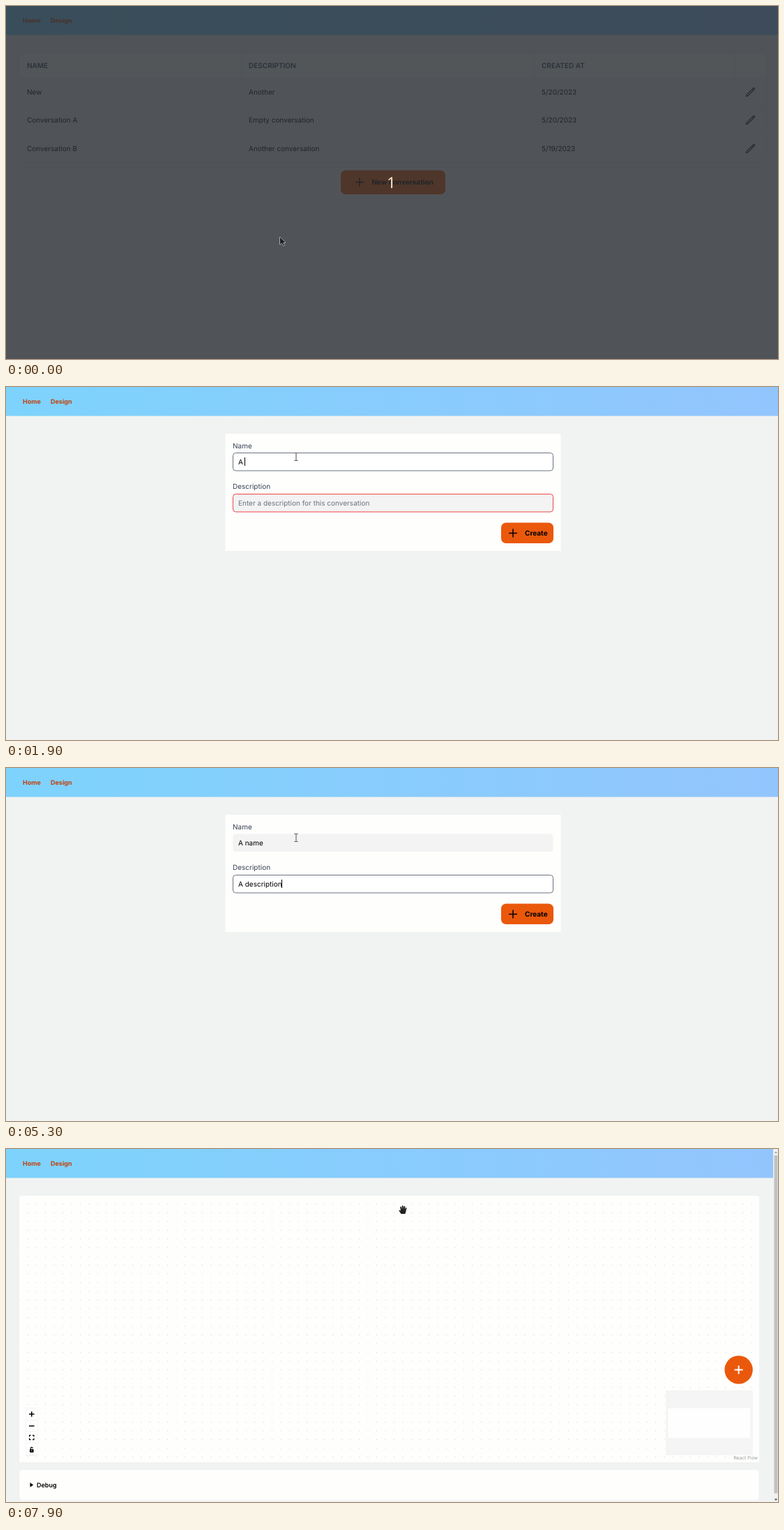
An HTML page for the animation above (8000 ms loop, 1107x506 px).

```html
<!DOCTYPE html>
<html lang="en">
<head>
<meta charset="utf-8">
<title>Conversation designer</title>
<style>
  html, body { margin: 0; width: 100%; height: 100%; overflow: hidden; background: #f1f3f2; }
  svg { display: block; }
  text { font: 10px Inter, sans-serif; white-space: pre; text-rendering: geometricPrecision; }
  .bold { font-weight: 700; }
  .head { font-weight: 600; fill: #374151; }
  .nav { font-size: 9px; font-weight: 700; fill: #c2410c; }
  .hint { fill: #6b7280; }
  .label { fill: #374151; }
  .status { font: 10.3px "Noto Sans", sans-serif; fill: #333; }
  .count { font: 22px "Noto Sans", sans-serif; fill: #fbe6cd; text-anchor: middle; }
  .debug { font-size: 9px; font-weight: 600; }
  .credit { font-size: 6.67px; fill: #999; text-anchor: end; }
</style>
</head>
<body>
<svg id="stage" width="1107" height="506" viewBox="0 0 1107 506"></svg>
<script>
const LOOP = 8000, STEP = 100;
const ORANGE = '#ea580c';
const stage = document.getElementById('stage');

// Pointer path: time, x, y
const pointerPath = [
  [0, 393, 331], [100, 407, 319], [600, 537, 247], [800, 537, 247], [1300, 416, 104],
  [1400, 416, 104], [1500, 416, 100], [5700, 416, 100], [6000, 481, 64], [6600, 481, 64],
  [6700, 482, 63], [7100, 718, 140], [7200, 718, 140], [7900, 569, 87], [8000, 569, 87]
];

// Typed text: start time, number of letters
const nameKeys = [[1800, 1], [1900, 2], [2000, 3], [2200, 4], [2300, 5], [2400, 6]];
const descriptionKeys = [
  [3000, 1], [3100, 2], [3300, 3], [3400, 4], [3600, 5], [3700, 6],
  [4500, 7], [4800, 8], [5000, 9], [5100, 10], [5200, 12], [5300, 13]
];

const text = (x, y, s, cls = '') => `<text x="${x}" y="${y}" class="${cls}">${s}</text>`;
const rect = (x, y, w, h, fill, more = '') =>
  `<rect x="${x}" y="${y}" width="${w}" height="${h}" fill="${fill}" ${more}/>`;
const path = (d, more = '') => `<path d="${d}" ${more}/>`;
const stroke = (d, color, width = 1, more = '') =>
  path(d, `fill="none" stroke="${color}" stroke-width="${width}" ${more}`);
const plus = (x, y, r, color, width) =>
  stroke(`M${x - r} ${y}h${2 * r}M${x} ${y - r}v${2 * r}`, color, width);

function typed(full, keys, t) {
  const last = keys.filter(([start]) => start <= t).pop();
  return last ? full.slice(0, last[1]) : '';
}

function pointerAt(t) {
  const i = pointerPath.findIndex(([end]) => end > t);
  const [t0, x0, y0] = pointerPath[i - 1], [t1, x1, y1] = pointerPath[i];
  const k = (t - t0) / (t1 - t0);
  return [x0 + (x1 - x0) * k, y0 + (y1 - y0) * k];
}

const navBar = width => `
  <defs><linearGradient id="sky"><stop stop-color="#7dd3fc"/><stop offset="1" stop-color="#93c5fd"/></linearGradient></defs>
  ${rect(0, 0, width, 41.5, 'url(#sky)')}
  ${text(24, 24, 'Home', 'nav')}${text(64, 24, 'Design', 'nav')}`;

const pencil = y => stroke(
  'M16.86 4.49l1.69-1.69a1.88 1.88 0 1 1 2.65 2.65L6.83 19.82a4.5 4.5 0 0 1-1.9 1.13l-2.68.8.8-2.69a4.5 4.5 0 0 1 1.13-1.9zm0 0L19.5 7.13',
  '#000', 1.7, `stroke-linejoin="round" transform="translate(1060 ${y - 7.5}) scale(.62)"`);

const statusBar = () =>
  rect(-1, 492.5, 369.5, 15, '#e9e9e9', 'rx="1" stroke="#cfcfcf"') +
  text(2.5, 505, 'localhost:3000/design/new', 'status');

function tablePage(t) {
  const rows = [
    ['New', 'Another', '5/20/2023', 127],
    ['Conversation A', 'Empty conversation', '5/20/2023', 167],
    ['Conversation B', 'Another conversation', '5/19/2023', 208]
  ];
  const cells = ([a, b, c, y], cls) => text(30, y, a, cls) + text(348, y, b, cls) + text(768, y, c, cls);
  return rect(19.5, 68, 1071, 158, '#e3e5e6', 'rx="7"') +
    rect(19.5, 67, 1070.5, 157.5, '#f2f3f3', 'rx="7" stroke="#e5e7eb"') +
    path('M20 103V74q0-6.5 6.5-6.5H1083q6.5 0 6.5 6.5v29z', 'fill="#f9faf8"') +
    stroke('M20 103.5H1090M20 143.5H1090M20 184.5H1090M338 67.5v36M757.5 67.5v36M1045 67.5v36', '#e5e7eb') +
    cells(['NAME', 'DESCRIPTION', 'CREATED AT', 89], 'head') +
    rows.map(r => cells(r) + pencil(r[3] - 3.5)).join('') +
    rect(480, 235.5, 150, 34.5, ORANGE, 'rx="7"') +
    plus(507, 252.5, 6, '#000', 1.4) + text(524.5, 256, 'New conversation', 'bold') +
    (t >= 500 ? statusBar() : '');
}

function field(y, value, hint, focused) {
  const border = focused ? '#6b7280' : value ? 'none' : '#ef4444';
  return rect(325.5, y + .5, 459, 25.5, focused ? '#fff' : '#f2f3f2', `rx="4" stroke="${border}"`) +
    (value ? text(333, y + 17, value, focused ? 'typing' : '') : text(333, y + 17, hint, 'hint')) +
    (focused ? rect(333, y + 7, 1, 12, '#000', 'id="caret"') : '');
}

function formPage(t) {
  const name = typed('A name', nameKeys, t);
  const slip = t >= 4000 && t < 4300 ? 'i' : '';
  const description = typed('A description', descriptionKeys, t) + slip;
  const done = t >= 5800;
  return rect(314.5, 67, 481, 168, '#fefefd') +
    text(325, 88, 'Name', 'label') +
    field(94, name, 'Enter a short name for this conversation', t >= 1300 && t < 2500) +
    text(325, 146, 'Description', 'label') +
    field(153, description, 'Enter a description for this conversation', t >= 2500 && !done) +
    rect(710, 194.5, 75, 29.5, ORANGE, `rx="7" ${done ? 'stroke="#111" stroke-width="1.6"' : ''}`) +
    plus(727, 209.5, 6, '#000', 1.5) + text(744, 213, 'Create', 'bold') +
    (t < 900 ? statusBar() : '');
}

const flowPage = () => `
  <defs><pattern id="dots" x="25.25" y="72.75" width="12.5" height="12.5" patternUnits="userSpaceOnUse">
    <circle cx="6.25" cy="6.25" r=".6" fill="#c8c8cb"/></pattern></defs>
  ${rect(19, 67, 1061, 382, '#fefefd', 'rx="3"')}${rect(19, 67, 1061, 382, 'url(#dots)')}
  ${rect(28, 371.5, 17.5, 68, '#ededed', 'rx="1"')}
  ${[372, 388.7, 405.4, 422.1].map(y => rect(28.5, y, 16.5, 16, '#fefefe')).join('')}
  ${plus(36.8, 380, 3.8, '#000', 1.5)}${stroke('M33 397h7.6', '#000', 1.5)}
  ${stroke('M33.6 412.4v-2h2M38 410.4h2v2M40 414.6v2h-2M35.6 416.6h-2v-2', '#000', 1.2)}
  ${rect(34, 430.3, 5.6, 4.6, '#000', 'rx=".8"')}${stroke('M35.3 430.5v-1.3a1.5 1.5 0 0 1 3-.2', '#000', 1.1)}
  ${rect(36.3, 431.8, 1, 1.5, '#fff')}
  <circle cx="1050.6" cy="316.5" r="20.2" fill="${ORANGE}"/>${plus(1050.6, 316.5, 6, '#fff', 2)}
  ${rect(946, 346, 125, 93, '#f5f5f5')}${rect(949.5, 371.5, 117.5, 42.5, '#fefefe')}
  ${rect(1044, 438.5, 36, 10.5, '#fefefd')}${text(1078, 445, 'React Flow', 'credit')}
  ${rect(19, 459.5, 1061, 44.5, '#fefefd', 'rx="5" stroke="#ebeded" stroke-width=".6"')}
  ${path('M34.5 478.3l4.7 3.2-4.7 3.2z')}${text(44, 485, 'Debug', 'debug')}
  ${rect(1100, 0, 7, 506, '#f0f0f0')}${rect(1101.5, 9, 5, 484.5, '#c1c1c1')}
  ${path('M1101.8 6l2.2-2.6 2.2 2.6z', 'fill="#a0a0a0"')}${path('M1101.8 501.5l2.2 2.6 2.2-2.6z', 'fill="#444"')}`;

const outlined = 'fill="#222" stroke="#fff" stroke-width="1" stroke-linejoin="round" paint-order="stroke"';
const cursors = {
  arrow: path('M0 0v11l2.6-2.3 1.8 4 1.8-.8-1.8-3.9h3.4z', outlined),
  ibeam: stroke('M-2.5-5.5h2l.5.5.5-.5h2M0-5v10M-2.5 5.5h2l.5-.5.5.5h2', '#fff', 2.2) +
    stroke('M-2.5-5.5h2l.5.5.5-.5h2M0-5v10M-2.5 5.5h2l.5-.5.5.5h2', '#444'),
  pointer: path('M-1 0q1-1.2 2 0v5l5 1q1.5.5 1.2 2.500l-.8 5h-6l-3.400-5q0-1.500 2-.5z', outlined),
  grab: path('M-2.500 6L-5.500 1.500q0-1.500 1.500-.8l1 1-.8-5.500q.8-1.200 1.800 0l.7 3.200v-4.700q1-1.200 2 0v4.700l.8-4.200q1-1 1.900.2l-.6 4.600 1-2.600q1.200-.8 1.700.3l-1.200 5.300-.9 3z', outlined)
};

function pointer(t) {
  const [x, y] = pointerAt(t);
  const inField = x > 325 && x < 785 && ((y > 94 && y < 121) || (y > 153 && y < 180));
  const overButton = x > 480 && x < 630 && y > 235 && y < 270;
  const kind = t < 800 ? (overButton ? 'pointer' : 'arrow')
    : t < 6800 ? (inField ? 'ibeam' : 'arrow')
    : y > 67 ? 'grab' : 'arrow';
  return `<g transform="translate(${x} ${y})">${cursors[kind]}</g>`;
}

function render(t) {
  const page = t < 800 ? tablePage : t < 6800 ? formPage : flowPage;
  const countdown = t < 100
    ? rect(0, 0, 1107, 506, '#292d32', 'opacity=".8"') + text(552.5, 260.5, '1', 'count') : '';
  stage.innerHTML = rect(0, 0, 1107, 506, '#f1f3f2') + navBar(t < 6800 ? 1107 : 1100) +
    page(t) + countdown + pointer(t);
  const caret = document.getElementById('caret'), line = stage.querySelector('.typing');
  if (caret && line) caret.setAttribute('x', Math.floor(333 + line.getComputedTextLength()));
}

let shown = -1;
function tick() {
  const t = Math.floor(performance.now() % LOOP / STEP) * STEP;
  if (t !== shown) render(shown = t);
  requestAnimationFrame(tick);
}
tick();
</script>
</body>
</html>
```
